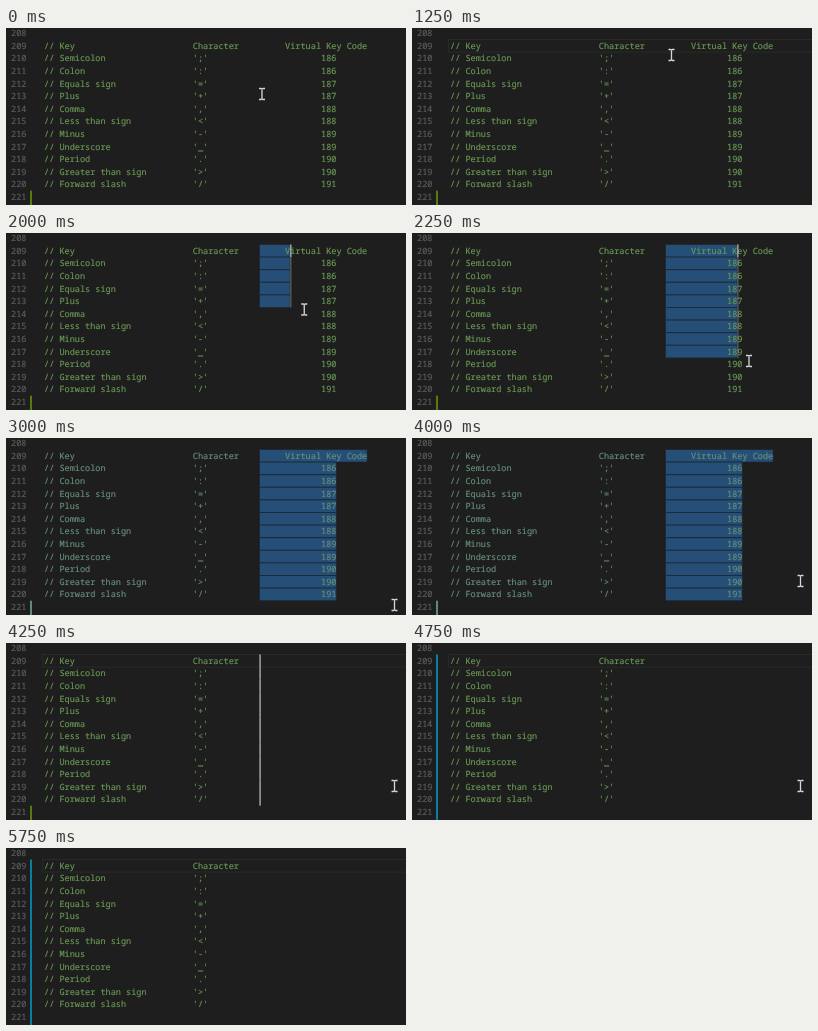
These frames come from a looping animation (400x177 px, 6000 ms). An HTML page:

```html
<!DOCTYPE html>
<html lang="en">
<head>
<meta charset="utf-8">
<title>Column selection</title>
<style>
  html, body { margin: 0; height: 100%; overflow: hidden; background: #1e1e1e; }
  svg { display: block; width: 100%; height: 100%; --text: #6a9955; --num: #5e5e5e; --bar: #587c0c; }
  svg.selected { --text: #66907a; --bar: #5f8a80; }
  svg.modified { --bar: #0c7d9d; }
  text { font: 8.55px "Noto Sans Mono", "DejaVu Sans Mono", monospace; white-space: pre;
         text-rendering: geometricPrecision; fill: var(--text); stroke: var(--text); stroke-width: .15; }
  .num { fill: var(--num); stroke: var(--num); }
  #bar { fill: var(--bar); }
  #selection { fill: #264f78; stroke: #1e2630; stroke-width: .8; }
  #pointer { fill: none; stroke: #d8d8d8; stroke-width: 1.3; }
  #current { fill: none; stroke: #292929; }
</style>
</head>
<body>
<svg id="stage" viewBox="0 0 400 177">
  <rect id="current" x="36.5" y="11.5" width="370" height="12.6"/>
  <g id="selection"></g>
  <rect id="bar" x="24" width="2" height="177"/>
  <g id="words"></g>
  <g id="carets" fill="#c4c4b8"></g>
  <path id="pointer" d="M-3-5.5H-1L0-5L1-5.5H3M0-5V5M-3 5.5H-1L0 5L1 5.5H3"/>
</svg>
<script>
const $ = id => document.getElementById(id);
const LOOP = 6000, STEP = 250;
const CHAR = 5.13, LINE = 12.6, LEFT = 38, TOP = 11.5, START = 42;
const DRAG_END = 2500, CUT = 4250, MARK = 4500;
const colX = col => LEFT + col * CHAR;
const rowY = row => TOP + row * LINE;

const names = ["Semicolon", "Colon", "Equals sign", "Plus", "Comma", "Less than sign",
  "Minus", "Underscore", "Period", "Greater than sign", "Forward slash"];
const table = [
  ["Key", "Character", "Virtual Key Code"],
  ...names.map((name, i) => [name, `'${";:=+,<-_.>/"[i]}'`, 186 + (i >> 1)])
];

// Pointer path: time, x, y
const path = [
  [0, 256, 66], [250, 259.5, 31], [1750, 259.5, 25], [2250, 337, 128], [2500, 388.5, 162],
  [3000, 388.5, 167], [3500, 388.5, 166], [3750, 388.5, 143], [5000, 388.5, 143],
  [5250, 304, 151], [5750, 156, 191]
];
function pointerAt(t) {
  const i = path.findLastIndex(point => point[0] <= t);
  const [t0, x0, y0] = path[i], [t1, x1, y1] = path[i + 1] || [LOOP, x0, y0];
  const u = (t - t0) / (t1 - t0);
  return [x0 + (x1 - x0) * u, y0 + (y1 - y0) * u];
}

// The caret blinks anew after each of these actions.
const actions = [750, 1750, 2250, DRAG_END, CUT];
const caretOn = t => (t - actions.findLast(time => time <= t)) % 1000 < 500;

function add(parent, tag, attrs, content = "") {
  const el = document.createElementNS("http://www.w3.org/2000/svg", tag);
  for (const key in attrs) el.setAttribute(key, attrs[key]);
  el.textContent = content;
  return $(parent).appendChild(el);
}
const write = (row, x, content, cls = "") =>
  add("words", "text", { x, y: rowY(row) + 9.3, class: cls }, content);

for (let row = -1; row <= 12; row++) write(row, 5, 209 + row, "num");
const rows = table.map(([name, char, code], row) => {
  const col = row ? 54 : 47;
  write(row, LEFT, "// " + name);
  write(row, colX(29), char);
  return {
    end: col + String(code).length,
    code: write(row, colX(col), code),
    box: add("selection", "rect", { x: colX(START), y: rowY(row), height: LINE, rx: 1 }),
    caret: add("carets", "rect", { y: rowY(row), width: 1.2, height: LINE })
  };
});

function draw(now) {
  const t = Math.floor(now % LOOP / STEP) * STEP;
  const cut = t >= CUT, marked = t >= MARK;

  // The selection follows the pointer until the drag ends.
  const [dragX, dragY] = pointerAt(Math.min(t, DRAG_END));
  const count = Math.round((dragY - TOP) / LINE);
  const end = cut ? START : Math.max(START, Math.floor((dragX - LEFT) / CHAR) - 2);
  const selecting = end > START;

  rows.forEach((line, row) => {
    const x = colX(Math.min(end, line.end));
    const active = row < count;
    line.code.setAttribute("visibility", cut ? "hidden" : "visible");
    line.box.setAttribute("width", active ? x - colX(START) : 0);
    line.caret.setAttribute("x", x);
    line.caret.setAttribute("opacity", !active || !caretOn(t) ? 0 : selecting && row ? 0.4 : 1);
  });

  $("stage").classList.toggle("selected", t >= DRAG_END && !cut);
  $("stage").classList.toggle("modified", marked);
  $("current").setAttribute("opacity", cut || (t >= 750 && t < 1750) ? 1 : 0);
  $("bar").setAttribute("y", rowY(marked ? 0 : 12));
  $("pointer").setAttribute("transform", `translate(${pointerAt(t)})`);
}

const begin = performance.now();
function tick() {
  draw(performance.now() - begin);
  requestAnimationFrame(tick);
}
tick();
</script>
</body>
</html>
```
